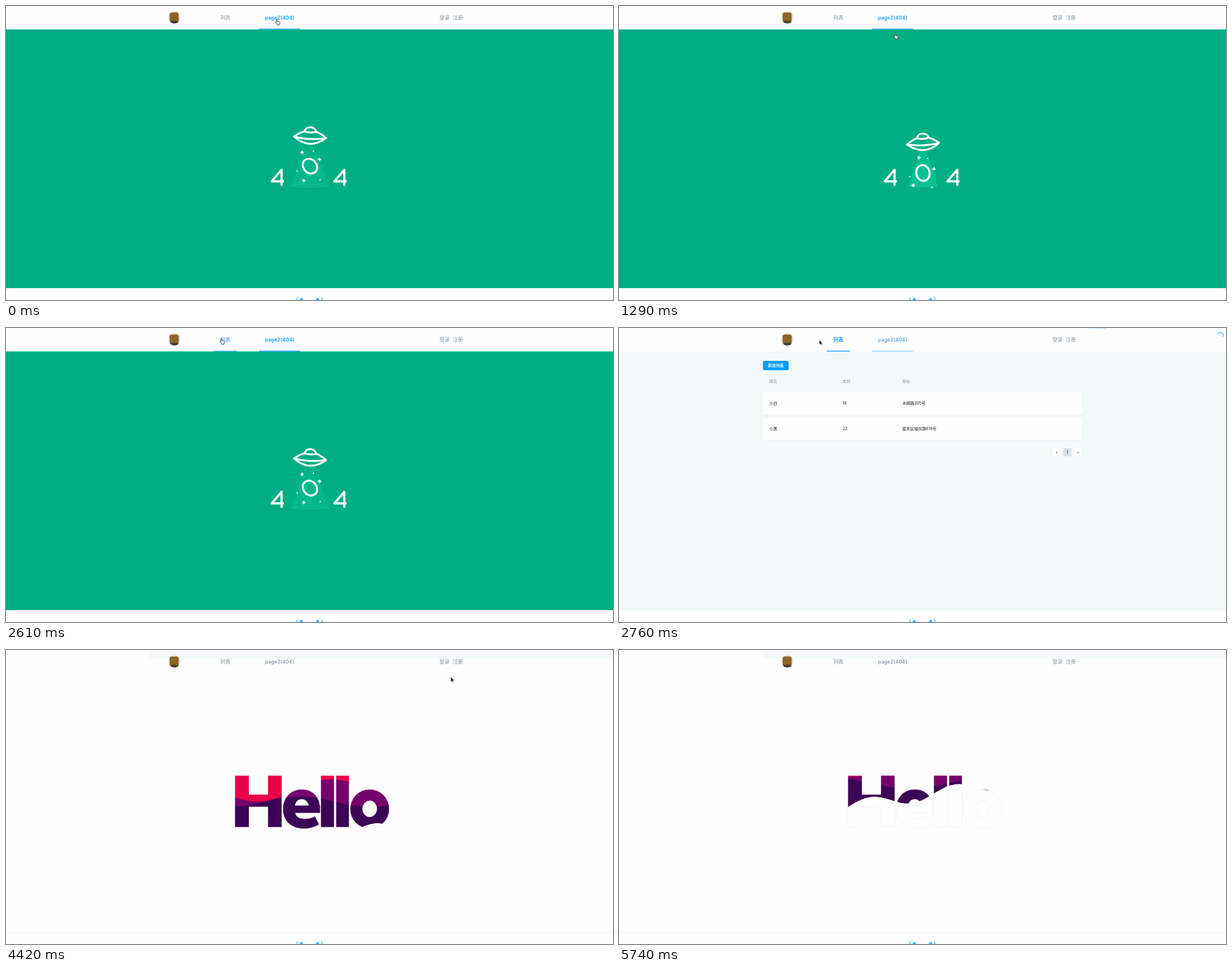
An HTML page that plays this animation: 1074x521 px, repeating every 5840 ms.

```html
<!DOCTYPE html>
<html lang="zh">
<head>
<meta charset="utf-8">
<style>
html, body { margin: 0; width: 100%; height: 100%; overflow: hidden; background: #fefefe; }
svg { display: block; width: 1074px; height: 521px; }
text { font-family: Inter, 'Noto Sans CJK SC', 'Noto Sans CJK', sans-serif; }
.nav { font-size: 9px; font-weight: 500; fill: #8296a2; }
.cell { font-size: 7px; fill: #1c1c1c; }
.head { font-size: 7px; fill: #8194a0; }
.white { fill: none; stroke: #fff; stroke-linecap: round; stroke-linejoin: round; }
</style>
</head>
<body>
<svg viewBox="0 0 1074 521">
  <defs>
    <linearGradient id="light" x1="0" y1="0" x2="0" y2="1">
      <stop offset="0" stop-color="#10dba6" stop-opacity=".5"/>
      <stop offset=".4" stop-color="#10dba6"/>
    </linearGradient>
    <clipPath id="word"><path id="letters" clip-rule="evenodd" d="
      M405 222.5H430V256H463.5V222.5H488V314H463.5V278H430V314H405Z
      M556 283Q556.3 287 555.5 289H512C513 296 520 299 528 299C536 299 541 298 546.5 294.5L554 309
      C545 314.5 537 316.5 527 316.5C504 316.5 490 302 490 282C490 262 504 247 523 247C543 247 556 261 556 283Z
      M511.5 275.5H535.5C534 268 529 264.5 523.5 264.5C517 264.5 513 268 511.5 275.5Z
      M557 222.5H580.5V314H557ZM584 222.5H607V314H584Z
      M609 281.7A34.5 34.8 0 0 1 678 281.7A34.5 34.8 0 0 1 609 281.7Z
      M630.7 281.5A12.8 14.5 0 0 0 656.3 281.5A12.8 14.5 0 0 0 630.7 281.5Z"/></clipPath>
    <clipPath id="round"><circle cx="298" cy="20" r="11"/></clipPath>
  </defs>
  <rect width="1074" height="521" fill="#fefefe"/>

  <g id="lost">
    <rect y="41.5" width="1074" height="458.5" fill="#00ae83"/>
    <path id="beam" fill="url(#light)"/>
    <ellipse id="pool" cx="538" cy="318.5" ry="2.3" fill="none" stroke="#2cc39c" stroke-width=".9"/>
    <g class="white" stroke-width="4">
      <path id="four" d="M487.6 317V290.3L470 310.8H490"/>
      <use href="#four" x="111"/>
    </g>
    <g id="core">
      <ellipse id="zero" class="white" rx="11.8" ry="14" stroke-width="3.6"/>
      <g id="stars"></g>
    </g>
    <path id="ufo" class="white" stroke-width="3.3" d="M-28.5 0Q-18-8-10.5-10C-8-20.5 8-20.5 10.5-10Q18-8 28.5 0Q0 23-28.5 0Q0 6 28.5 0M-10.5-10Q0-7 10.5-10"/>
  </g>

  <g id="list">
    <rect id="paper" y="42" width="1074" height="459" fill="#f3f8f9"/>
    <rect x="254.7" y="58.3" width="45.5" height="16.4" rx="2.5" fill="#059cff"/>
    <text x="277.5" y="69.2" text-anchor="middle" font-size="6.9" font-weight="700" fill="#fff">新增列表</text>
    <g id="table"></g>
    <g id="pager"></g>
  </g>

  <g id="home">
    <g id="waves" clip-path="url(#word)"></g>
    <use href="#letters" fill="none" stroke="#f2edf1" stroke-width=".6"/>
  </g>

  <g id="blank">
    <rect x="254.5" width="819.5" height="16" fill="#f5f9fa"/>
    <rect y="500.5" width="1074" height="1" fill="#eff1f2"/>
  </g>

  <g clip-path="url(#round)">
    <circle cx="298" cy="20" r="11" fill="#e6e3dd"/>
    <rect x="289.5" y="11.5" width="16" height="17" rx="4" fill="#8d6526"/>
    <ellipse cx="297.5" cy="29" rx="9" ry="3" fill="#4a4036"/>
  </g>
  <text id="tabList" class="nav" x="388" y="24.2" text-anchor="middle">列表</text>
  <text id="tabLost" class="nav" x="484" y="24.2" text-anchor="middle">page2(404)</text>
  <rect id="barList" x="367.7" y="40.2" width="40.4" height="1.5" fill="#1a9fff"/>
  <rect id="barLost" x="447.7" y="40.2" width="72.6" height="1.5" fill="#1a9fff"/>
  <text class="nav" x="767" y="24">登录</text>
  <text class="nav" x="790.5" y="24">注册</text>

  <g fill="#0fa3fb">
    <text x="513" y="523.5" font-size="10" font-weight="500">(</text>
    <text x="557" y="523.5" font-size="10" font-weight="500">)</text>
    <g id="eye"><circle cx="522.3" cy="519.8" r="2.6"/><circle cx="521.6" cy="518.9" r=".9" fill="#fff"/></g>
    <use href="#eye" x="28.8"/>
  </g>

  <g id="loader" stroke="#29a9ff">
    <path d="M820 0L862 .3V1.4Z" fill="#29a9ff" stroke="none" opacity=".4"/>
    <path id="spin" d="M-4.6-2.2A5 5 0 0 1 4.6 2.2" fill="none" stroke-width="1.2"/>
  </g>
  <path id="hand" fill="#fff" stroke="#222" stroke-width=".9" d="M2.2 6V1.3a.9.9 0 0 1 1.8 0V4.2l3.6.7q1.2.3 1.1 1.5L8 9v1.8H3.8V9.6L.7 6.8q-.5-1.2.7-1.3z"/>
  <path id="arrow" fill="#000" stroke="#fff" stroke-width=".7" d="M0 0V8.6L2 6.9 3.4 10 4.9 9.3 3.6 6.3H6.2z"/>
</svg>
<script>
const LOOP = 5840;
const LIST_AT = 2760, BLANK_AT = 2900, LOADED_AT = 3170, HOME_AT = 3620;

const $ = id => document.getElementById(id);
const mix = (a, b, k) => a + (b - a) * k;
const ramp = (t, a, b) => Math.max(0, Math.min(1, (t - a) / (b - a)));
const within = (t, a, b) => t >= a && t < b;
const show = (id, on) => { $(id).style.display = on ? '' : 'none'; };
const set = (el, attrs) => { for (const k in attrs) el.setAttribute(k, attrs[k]); return el; };
const add = (parent, tag, attrs, text = '') => {
  const el = set(document.createElementNS('http://www.w3.org/2000/svg', tag), attrs);
  el.textContent = text;
  return $(parent).appendChild(el);
};

// List page
const COLS = [266, 395.7, 501.3];
const row = (cells, y, cls) => cells.forEach((s, i) => add('table', 'text', { x: COLS[i], y, class: cls }, s));
row(['姓名', '年龄', '地址'], 96.7, 'head');
[['小白', '18', '木桐路305号'], ['小黑', '22', '星禾区柚岚路618号']].forEach((cells, i) => {
  const y = 113.8 + i * 45.2;
  add('table', 'rect', { x: 255, y: y + .8, width: 564, height: 39.6, fill: '#e6ebee' });
  add('table', 'rect', { x: 255, y, width: 564, height: 39.6, fill: '#fefefe' });
  row(cells, y + 22.3, 'cell');
});
['‹', '1', '›'].forEach((s, i) => {
  const x = 767.3 + i * 18.7;
  add('pager', 'rect', { x, y: 213, width: 14.2, height: 14.2, rx: 1.5, fill: i === 1 ? '#dbe3e6' : '#fff' });
  add('pager', 'text', { x: x + 7.1, y: 222.6, 'text-anchor': 'middle', class: 'cell' }, s);
});

// Lost page: stars swing around the zero while everything hovers
const PLUSES = [[-14, -24.5], [17, -12], [-11, 25.5]];
const DOTS = [[6, -26.5], [-22.5, 8.5], [18, 24]];
const pluses = PLUSES.map(() => add('stars', 'path', { d: 'M-3 0H3M0-3V3', stroke: '#fff', 'stroke-width': 2.2 }));
const dots = DOTS.map(() => add('stars', 'circle', { r: 1.2, fill: '#fff' }));
const swing = (els, spots, turn) => els.forEach((el, i) =>
  set(el, { transform: `rotate(${turn}) translate(${spots[i]}) rotate(${-turn})` }));

function drawLost(t) {
  const u = (.92 - Math.cos(2 * Math.PI * (t / 3000 + .07))) / 1.92;
  const top = mix(245, 256, u), neck = mix(7.5, 5.5, u), foot = mix(33.5, 25.5, u);
  set($('ufo'), { transform: `translate(538 ${mix(232.6, 243.9, u)}) rotate(${mix(2.7, -3, u)})` });
  set($('core'), { transform: `translate(537.8 ${mix(283.8, 296, u)})` });
  set($('zero'), { transform: `rotate(${mix(-40, -10, u)})` });
  set($('beam'), {
    d: `M${538 - neck} ${top}H${538 + neck}L${538 + foot} 318.5A${foot} 2.6 0 0 1 ${538 - foot} 318.5Z`,
    opacity: mix(.2, .45, u)
  });
  set($('pool'), { rx: foot, opacity: mix(.8, .5, u) });
  swing(pluses, PLUSES, 15 * u);
  swing(dots, DOTS, 5 * u);
}

// Home page: each liquid edge is a tilted sine that rises and drifts (speed in px per second)
const LIQUIDS = [
  { fill: '#ff4404', from: 225.5, to: 120, ease: 1, tilt: 0, amp: 2, length: 95, crest: 400, speed: 30 },
  { fill: '#e8044a', from: 244, to: 150, ease: 1, tilt: 0, amp: 7, length: 240, crest: 450, speed: 30 },
  { fill: '#74046c', from: 275, to: 201, ease: 1, tilt: -.06, amp: 16, length: 240, crest: 470, speed: -25 },
  { fill: '#3c0455', from: 299, to: 237, ease: .74, tilt: 0, amp: 9, length: 250, crest: 572, speed: 91 }
];
const DRAIN = { from: 459, to: 257, ease: .5, tilt: -.15, amp: 11, length: 150, crest: 608, speed: -42 };
const liquids = LIQUIDS.map(({ fill }) => add('waves', 'path', { fill }));

function edge(w, t) {
  const level = mix(w.from, w.to, ramp(t, HOME_AT, 5740) ** w.ease);
  const crest = w.crest + w.speed * (t - HOME_AT) / 1000;
  const points = [];
  for (let x = 400; x <= 684; x += 4) {
    const y = level + w.tilt * (x - 540) + w.amp * Math.cos(2 * Math.PI * (x - crest) / w.length);
    points.push(`${x} ${y.toFixed(2)}`);
  }
  return points;
}

function drawHome(t) {
  const floor = edge(DRAIN, t).reverse();
  LIQUIDS.forEach((w, i) => set(liquids[i], { d: `M${edge(w, t).concat(floor).join('L')}Z` }));
}

// Navigation and pointer
const POINTER = [[0, 476, 23], [1140, 477, 25], [1290, 485.5, 48], [1700, 440, 60], [2310, 352, 22], [2610, 378, 18],
  [2760, 354.5, 21], [3170, 298, 23], [3830, 297.5, 23], [4420, 786.5, 47], [5010, 985, 535]];

function drawTab(name, level) {
  const rgb = [[130, 26], [150, 159], [162, 255]].map(([a, b]) => Math.round(mix(a, b, level)));
  $('tab' + name).style.fill = `rgb(${rgb})`;
  $('tab' + name).style.fontWeight = level > .9 ? 600 : 500;
  set($('bar' + name), { opacity: level });
}

function drawPointer(t) {
  const hand = t < 1440 || within(t, 2460, LIST_AT) || within(t, LOADED_AT, 4100);
  const next = POINTER.findIndex(p => p[0] > t);
  const b = POINTER.at(next), a = next > 0 ? POINTER[next - 1] : b;
  const k = ramp(t, a[0], b[0]) || 0;
  show('hand', hand);
  show('arrow', !hand);
  set($(hand ? 'hand' : 'arrow'), { transform: `translate(${mix(a[1], b[1], k)} ${mix(a[2], b[2], k)})` });
}

function draw(t) {
  show('lost', t < LIST_AT);
  show('list', within(t, LIST_AT, HOME_AT));
  show('paper', t < BLANK_AT);
  show('blank', t >= BLANK_AT);
  show('home', t >= HOME_AT);
  show('loader', within(t, LIST_AT, LOADED_AT));
  set($('loader'), { opacity: 1 - ramp(t, BLANK_AT, LOADED_AT) });
  set($('spin'), { transform: `translate(1064.3 13) rotate(${(t - LIST_AT) * .9})` });
  if (t < LIST_AT) drawLost(t);
  if (t >= HOME_AT) drawHome(t);
  drawTab('List', ramp(t, 2310, 2710) - ramp(t, 3460, 4000));
  drawTab('Lost', 1 - ramp(t, 2620, 2900));
  drawPointer(t);
}

const start = performance.now();
function tick() {
  draw((performance.now() - start) % LOOP);
  requestAnimationFrame(tick);
}
tick();
</script>
</body>
</html>
```
